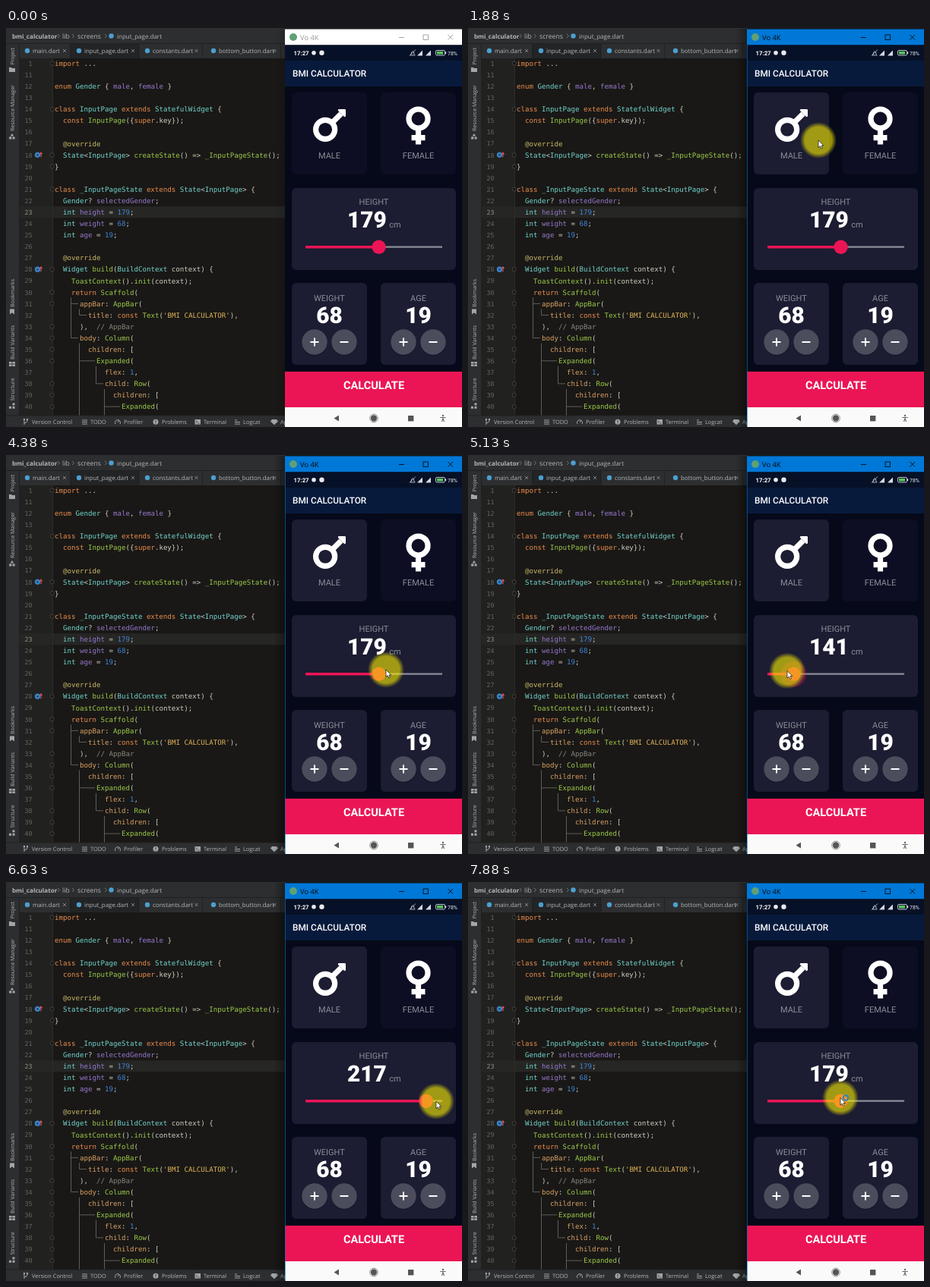
Animation, 600 px wide and 526 px high, one loop 8 s. Source, as an HTML page:

```html
<!DOCTYPE html>
<html lang="en">
<head>
<meta charset="utf-8">
<title>BMI calculator</title>
<style>
  html, body { margin: 0; height: 100%; overflow: hidden; background: #191816; }
  svg { display: block; width: 600px; height: 526px; }
  text { white-space: pre; text-rendering: geometricPrecision; }
  .ui { font-family: "Open Sans", "Noto Sans", sans-serif; fill: #b4b6b8; }
  .code { font-family: "DejaVu Sans Mono", monospace; font-size: 9.14px; fill: #cfcdc2; }
  .app { font-family: Roboto, sans-serif; }
  .label { font-size: 11px; fill: #8d8e98; }
  .big { font-size: 29.8px; font-weight: 900; fill: #fff; }
  .mid { text-anchor: middle; }
</style>
</head>
<body>
<svg id="stage" viewBox="0 0 600 526"></svg>
<script>
const stage = document.getElementById('stage');

// Markup helpers
const rect = (x, y, w, h, fill, more = '') =>
  `<rect x="${x}" y="${y}" width="${w}" height="${h}" fill="${fill}" ${more}/>`;
const circle = (x, y, r, fill, more = '') =>
  `<circle cx="${x}" cy="${y}" r="${r}" fill="${fill}" ${more}/>`;
const line = (d, color, width = 1, more = '') =>
  `<path d="${d}" fill="none" stroke="${color}" stroke-width="${width}" ${more}/>`;
const shape = (d, fill, more = '') => `<path d="${d}" fill="${fill}" ${more}/>`;
const text = (x, y, s, cls, more = '') =>
  `<text x="${x}" y="${y}" class="${cls}" ${more}>${s}</text>`;
const esc = s => s.replace(/&/g, '&amp;').replace(/</g, '&lt;').replace(/>/g, '&gt;');

const CHROME = '#2d2e30', EDGE = '#1f2021', ICON = '#a3a6a8';
const PINK = '#eb1555', ACTIVE = '#1c1c32', IDLE = '#0d0e23';

// ---- Code editor ----
const source = `import ...

enum Gender { male, female }

class InputPage extends StatefulWidget {
  const InputPage({super.key});

  @override
  State<InputPage> createState() => _InputPageState();
}

class _InputPageState extends State<InputPage> {
  Gender? selectedGender;
  int height = 179;
  int weight = 68;
  int age = 19;

  @override
  Widget build(BuildContext context) {
    ToastContext().init(context);
    return Scaffold(
      appBar: AppBar(
        title: const Text('BMI CALCULATOR'),
      ),  // AppBar
      body: Column(
        children: [
          Expanded(
            flex: 1,
            child: Row(
              children: [
                Expanded(`.split('\n');

const syntax = [
  ['//.*', '#85857d'],
  ["'.*?'", '#e0b458'],
  ['@\\w+', '#c8b768'],
  ['\\b(?:import|enum|class|extends|const|super|return)\\b', '#e98b4c'],
  ['\\b\\d+\\b', '#3f86d8'],
  ['\\w+(?=\\()', '#9cc94a'],
  ['\\bint\\b|_?[A-Z]\\w*', '#72d3cc'],
  ['\\b(?:male|female|selectedGender|height|weight|age)\\b', '#9578cc'],
  ['\\w+(?=:)', '#d9a066']
];
const tokens = new RegExp(syntax.map(s => `(${s[0]})`).join('|'), 'g');

function highlight(s) {
  let out = '', last = 0;
  for (const m of s.matchAll(tokens)) {
    const color = syntax[m.slice(1).findIndex(g => g !== undefined)][1];
    out += esc(s.slice(last, m.index)) + `<tspan fill="${color}">${esc(m[0])}</tspan>`;
    last = m.index + m[0].length;
  }
  return out + esc(s.slice(last));
}

const rowY = n => 46.7 + 15.08 * (n === 1 ? 0 : n - 10);

function editor() {
  let out = rect(0, 0, 600, 526, '#191816') + rect(18, 40, 44, 471, '#212120') +
    rect(18, rowY(23) - 7.5, 349, 15, '#262624') + line('M61.5 40V511', '#2c2c2a');
  source.forEach((s, i) => {
    const n = i ? i + 10 : 1, y = rowY(n);
    out += text(34.5, y + 3.2, n, 'code',
      `text-anchor="end" style="font-size:8.4px;fill:${n === 23 ? '#8f8e8a' : '#636462'}"`);
    const indent = s.search(/\S|$/);
    out += text(64 + 5.5 * indent, y + 3.3, highlight(s.trim()), 'code');
    if (/[[({]$|\.\.\.$|^}$|^ +\),|=>/.test(s))
      out += rect(58.5, y - 2.3, 4.6, 4.6, '#191816', 'rx="1" stroke="#4a4a48" stroke-width=".8"');
  });
  for (const n of [18, 28]) {
    const y = rowY(n);
    out += circle(41.5, y, 3.6, '#3c86c8') + circle(41.5, y, 1.5, '#1c4f80') +
      line(`M46 ${y + 3}V${y - 3}M44.4 ${y - 1}L46 ${y - 3.2}L47.6 ${y - 1}`, '#e05555', 1.1);
  }
  const at = n => rowY(n).toFixed(1);
  return out + line(
    `M85.5 ${rowY(30) + 7}V${at(34)}H95M85.5 ${at(31)}H95` +
    `M96.5 ${rowY(31) + 7}V${at(32)}H106M96.5 ${rowY(34) + 7}V511M96.5 ${at(36)}H117` +
    `M118.5 ${rowY(36) + 7}V${at(38)}H128M129.5 ${rowY(38) + 7}V511M129.5 ${at(40)}H150`, '#666662', .9);
}

const fileIcon = (x, y) => circle(x, y, 3.2, '#4c9fd0');
const cross = (x, y, r, color, w = .9) =>
  line(`M${x - r} ${y - r}l${2 * r} ${2 * r}m0 ${-2 * r}l${-2 * r} ${2 * r}`, color, w);

function chrome() {
  let out = rect(0, 0, 367, 40, CHROME) + rect(0, 40, 17.5, 471, CHROME) +
    rect(0, 511, 367, 15, CHROME) + line('M0 20.5H367M0 511H367M17.5 20V511', EDGE);
  const crumb = 'font-size="8.7"';
  out += text(8, 13.5, 'bmi_calculator', 'ui', 'font-size="8.1" font-weight="700"') +
    text(74, 13.5, 'lib', 'ui', crumb) + text(94, 13.5, 'screens', 'ui', crumb) +
    text(146, 13.5, 'input_page.dart', 'ui', 'font-size="8"') + fileIcon(138.5, 10.5);
  for (const x of [68, 87, 130]) out += line(`M${x} 8l2.5 2.5l-2.5 2.5`, '#85888a', .8);

  out += rect(84, 21, 91, 19, '#232425');
  const tabs = [['main.dart', 35, 77], ['input_page.dart', 103, 167],
    ['constants.dart', 193, 250.5], ['bottom_button.dart', 280, 353.5]];
  for (const [name, x, close] of tabs)
    out += fileIcon(x - 7, 30) + text(x, 33, name, 'ui', 'font-size="7.9"') +
      cross(close, 30, 2, '#8b8e90') + line(`M${close + 8} 21V40`, EDGE, .8);

  const side = [['Project', 37, 55], ['Resource Manager', 105.5, 143], ['Bookmarks', 349.5, 374],
    ['Build Variants', 414.5, 443], ['Structure', 476.5, 498]];
  for (const [name, y, icon] of side)
    out += text(0, 0, name, 'ui mid', `font-size="7" transform="translate(11 ${y}) rotate(-90)"`) +
      sideIcon[name](icon);

  const foot = [['Version Control', 34], ['TODO', 111], ['Profiler', 155], ['Problems', 205],
    ['Terminal', 260], ['Logcat', 312], ['App Inspection', 361]];
  for (const [name, x] of foot)
    out += text(x, 522.2, name, 'ui', 'font-size="7.4"') + footIcon[name](x - 8);
  return out;
}

const sideIcon = {
  Project: y => shape(`M4 ${y - 3}h3l1 1h4v5H4z`, ICON),
  'Resource Manager': y => shape(`M8 ${y - 4}l2.3 3.6H5.7z`, ICON) +
    rect(4.2, y + .4, 3.2, 3.2, ICON) + circle(10.2, y + 2, 1.7, ICON),
  Bookmarks: y => shape(`M5 ${y - 3.5}h6v7l-3-2.2l-3 2.2z`, ICON),
  'Build Variants': y => shape(`M4 ${y - 3}h8v6H4z`, ICON) + line(`M4 ${y}h8M8 ${y - 3}v6`, CHROME, .8),
  Structure: y => rect(8.5, y - 3.6, 3, 3, ICON) + rect(4, y + .8, 3, 3, ICON) + rect(8.5, y + .8, 3, 3, ICON)
};
const footIcon = {
  'Version Control': x => line(`M${x - 2} 516v7M${x + 2} 516v2q0 2-4 3`, ICON) +
    circle(x - 2, 516, 1.2, ICON) + circle(x + 2, 516, 1.2, ICON),
  TODO: x => line(`M${x - 3} 517h7M${x - 3} 519.5h7M${x - 3} 522h7`, ICON),
  Profiler: x => line(`M${x - 3} 522a3.5 3.5 0 1 1 6 0M${x} 520l2-2.5`, ICON),
  Problems: x => circle(x, 519.3, 3.5, ICON) + line(`M${x} 517v2.8M${x} 520.6v1`, CHROME),
  Terminal: x => rect(x - 3.5, 516, 7.5, 6.6, ICON) + line(`M${x - 2} 517.5l1.6 1.6l-1.6 1.6M${x + .5} 521h2`, CHROME, .8),
  Logcat: x => line(`M${x - 3} 517h3M${x - 3} 519.5h7M${x - 3} 522h7`, ICON),
  'App Inspection': x => shape(`M${x - 3} 516h6l2 2.5l-5 4.8l-5-4.8z`, ICON)
};

// ---- Phone window ----
const card = (x, y, w, fill, id = '') => rect(x, y, w, 108, fill, `rx="6" ${id && `id="${id}"`}`);

function roundButton(x, plus) {
  return circle(x, 415, 17, '#08091a', 'opacity=".35"') + circle(x, 414, 16.7, '#4b4d5c') +
    line(`M${x - 5.5} 414h11${plus ? `M${x} 408.5v11` : ''}`, '#fff', 2);
}

function counter(x, label, value) {
  return card(x, 336, 99, ACTIVE) + text(x + 49.5, 360, label, 'app label mid') +
    text(x + 49.5, 389.3, value, 'app big mid') + roundButton(x + 30, true) + roundButton(x + 69, false);
}

const glyph = (x, body) =>
  `<g transform="translate(${x} 99.8) scale(.112)" fill="none" stroke="#fff" stroke-width="64">${body}</g>`;

function phone() {
  const bars = x => shape(`M${x} 36.5l7-7v7z`, '#d6d9e2');
  return `<linearGradient id="shade"><stop stop-opacity="0"/><stop offset="1"/></linearGradient>` +
    rect(352, 1, 15, 525, 'url(#shade)', 'id="shadow"') +
    rect(367, 1, 233, 525, '#060919') +
    rect(367, 1.5, 233, 21, '#fff', 'id="bar"') + circle(378, 12, 5, '#5fa074') +
    `<g id="caption" fill="#999" stroke="#999">` +
    `<text x="387" y="15.6" stroke="none" style="font:9.4px 'Open Sans',sans-serif">Vo 4K</text>` +
    `<path d="M517 12.5h7M549 9h6.5v6.5h-6.5zM581.5 9l6.5 6.5m0-6.5l-6.5 6.5" fill="none" stroke-width=".9"/></g>` +
    rect(367, 22.5, 233, 20.5, '#061026') + rect(367, 43, 233, 34, '#071a3c') +
    text(378.5, 35.6, '17:27', 'app', 'font-size="7.8" font-weight="700" fill="#fff"') +
    circle(405, 32.7, 2.8, '#e8e8ee') + circle(415.5, 32.7, 3.2, '#e8e8ee') +
    line('M532 36q1.6-1 1.6-4q1.5-2.5 3 0q0 3 1.6 4zM531 36.5l8-8', '#d6d9e2', .8) +
    bars(541) + bars(552) +
    rect(565.5, 29.5, 12, 6.5, 'none', 'rx="1.5" stroke="#d6d9e2" stroke-width=".9"') +
    rect(567, 30.9, 8, 3.7, '#58c55b') + rect(578, 31.5, 1.2, 2.6, '#d6d9e2') +
    text(581, 35.6, '78%', 'app', 'font-size="7" fill="#e8e8ee"') +
    text(377, 64.3, 'BMI CALCULATOR', 'app', 'font-size="11.8" font-weight="500" fill="#fff"') +

    card(376, 85, 99, IDLE, 'male') + card(493, 85, 99, IDLE, 'female') +
    glyph(404, '<circle cx="144" cy="304" r="112"/><path d="M224 224L330 118"/>' +
      '<path d="M305 76H372V143Z" fill="#fff" stroke-width="24" stroke-linejoin="round"/>') +
    glyph(526.4, '<circle cx="144" cy="176" r="112"/><path d="M144 310V480M64 400H224"/>') +
    text(425.5, 171.8, 'MALE', 'app label mid') + text(542.5, 171.8, 'FEMALE', 'app label mid') +

    card(376, 211, 216, ACTIVE) + text(484, 233.3, 'HEIGHT', 'app label mid') +
    text(449, 263.1, '179', 'app big', 'id="value"') + text(504.2, 263.3, 'cm', 'app label') +
    line('M394 288.7H574', '#8d8e98', 2.2) +
    line('M394 288.7H490', PINK, 3.4, 'id="track"') +
    `<g id="thumb">${circle(0, 288.7, 17, PINK, 'id="halo" opacity=".3"')}${circle(0, 288.7, 9.2, PINK)}</g>` +

    counter(376, 'WEIGHT', 68) + counter(493, 'AGE', 19) +
    rect(367, 453, 233, 47, PINK) +
    text(484, 475.8, 'CALCULATE', 'app mid', 'font-size="14.6" font-weight="700" fill="#fff"') +
    rect(367, 500, 233, 26, '#fafafa') + shape('M431.5 514.5l6.5-4v8z', '#555') +
    circle(484, 514.5, 4.2, '#555') + circle(484, 514.5, 5.4, 'none', 'stroke="#777" stroke-width=".8"') +
    rect(529, 511, 7.4, 7.4, '#555') + circle(575, 511, 1.2, '#666') +
    line('M571.3 513.5h7.4M575 513v3M575 515l-1.6 4M575 515l1.6 4', '#666', 1.1) +
    line('M367.5 1V526', '#0078d7', 1, 'id="border" opacity=".6"');
}

function pointer() {
  return '<radialGradient id="glow"><stop offset=".74" stop-color="#faee00" stop-opacity=".6"/>' +
    '<stop offset="1" stop-color="#faee00" stop-opacity="0"/></radialGradient>' +
    `<g id="pointer">${circle(0, 0, 24, 'url(#glow)')}` +
    circle(7, 0, 3.2, 'none', 'id="busy" stroke="#2f83c9" stroke-width="2"') +
    '<path d="M0 0V9.6L2.2 7.6L3.8 11L5.4 10.3L3.9 7H6.8Z" fill="#fff" stroke="#111" stroke-width=".7"/></g>';
}

stage.innerHTML = editor() + chrome() + phone() + pointer();

// ---- Motion: the screen updates every 125 ms ----
const TICK = 125, TICKS = 64;

// Start tick of each move, then one point per tick; the pointer rests in between.
const moves = {
  0: [[640, 262]],
  1: [[585, 250], [537, 218]],
  4: [[505, 187], [474, 160]],
  10: [[455, 152], [433, 144]],
  15: [[461, 148], [535, 232], [552, 267], [536, 149]],
  24: [[480, 150], [428, 148]],
  30: [[488, 212], [542, 267]],
  33: [[551, 262], [526, 273], [500, 283], [480, 285]],
  38: [[474, 285], [464, 285], [446, 285], [420, 284.5], [396, 285], [364, 286], [392, 288]],
  45: [[393, 290], [396, 291], [406, 292], [437, 293], [478, 293], [520, 291], [546, 290]],
  52: [[558, 289], [566, 289], [577, 289], [579, 289], [574, 289], [558, 288], [539, 287]],
  59: [[524, 286], [511, 286], [501, 285], [494, 285], [490, 284.5]]
};
const path = [];
for (const start in moves) moves[start].forEach((p, i) => path[+start + i] = p);
for (let i = 1; i < TICKS; i++) path[i] = path[i] || path[i - 1];

const heights = [[0, 179], [37, 179], [41, 141], [43, 120], [47, 120], [49, 143],
  [51, 203], [53, 217], [54, 230], [56, 230], [58, 207], [63, 179]];
function heightAt(n) {
  const i = Math.max(1, heights.findIndex(h => h[0] >= n));
  const [a, u] = heights[i - 1], [b, v] = heights[i];
  return Math.round(u + (v - u) * (n - a) / (b - a));
}

const el = id => document.getElementById(id);
const set = (id, name, value) => el(id).setAttribute(name, value);
const show = (id, on) => set(id, 'visibility', on ? 'visible' : 'hidden');

function draw(n) {
  const focused = n >= 7, female = n >= 22 && n < 29, male = n >= 10 && !female;
  const ink = focused ? '#0a0a0a' : '#999';
  set('bar', 'fill', focused ? '#0078d7' : '#fff');
  set('caption', 'fill', ink);
  set('caption', 'stroke', ink);
  set('shadow', 'opacity', focused ? .35 : .12);
  show('border', focused);
  set('male', 'fill', male ? ACTIVE : IDLE);
  set('female', 'fill', female ? ACTIVE : IDLE);

  const h = heightAt(n), x = 394 + (h - 120) * 180 / 110;
  el('value').textContent = h;
  set('track', 'd', `M394 288.7H${x}`);
  set('thumb', 'transform', `translate(${x} 0)`);
  show('halo', n >= 38 && n < 53);
  set('pointer', 'transform', `translate(${path[n]})`);
  show('busy', n === 63);
}

function loop(now) {
  draw(Math.floor(now / TICK) % TICKS);
  requestAnimationFrame(loop);
}
draw(0);
requestAnimationFrame(loop);
</script>
</body>
</html>
```
